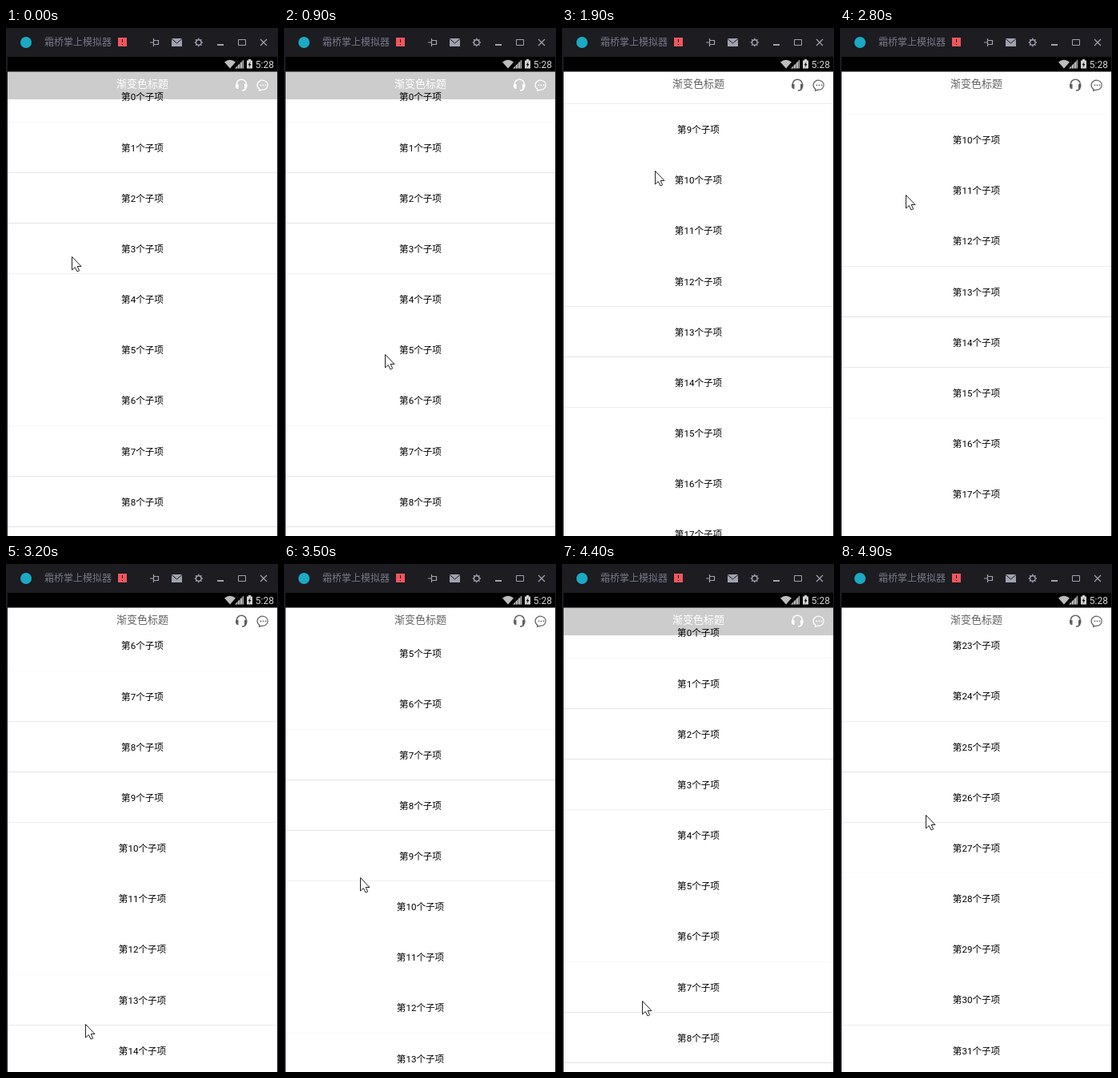
Write an HTML page with a canvas that moves like this. It is 340x634 px and loops after 5 s.

```html
<!DOCTYPE html>
<html lang="zh-CN">
<head>
<meta charset="utf-8">
<title>渐变色标题</title>
<style>
html, body { margin: 0; height: 100%; overflow: hidden; background: #1c1c21; }
canvas { display: block; }
</style>
</head>
<body>
<canvas id="stage" width="340" height="634"></canvas>
<script>
const ctx = document.getElementById('stage').getContext('2d');
const LOOP = 5000, STEP = 100;
const LEFT = 2, WIDTH = 337, TOP = 54, BAR = 35, ROW = 63 + 1 / 6;
const FADE = 288; // scroll distance over which the title bar turns white
const FONTS = 'Roboto, "Noto Sans CJK SC", "Noto Sans CJK", sans-serif';

// Eased progress of a gesture that begins at start and lasts duration ms.
function ease(t, start, duration) {
  const u = Math.min(1, Math.max(0, (t - start) / duration));
  return u * u * (3 - 2 * u);
}

// Swipe up, pull back in two drags, then a hard fling.
function scrollAt(t) {
  return 577.9 * ease(t, 1034.5, 1057)
    - 287.9 * ease(t, 2850, 521.7)
    - 290 * ease(t, 3750, 435.7)
    + 1436.9 * ease(t, 4500, 400);
}

function cursorAt(t) {
  let x = 82, y = 285;
  const glide = (start, duration, dx, dy) => {
    const p = ease(t, start, duration);
    x += dx * p;
    y += dy * p;
  };
  glide(0, 1050, 47, 129);
  glide(1050, 850, -13, -236);
  glide(1900, 900, -34, 30);
  glide(2800, 400, 17, 366);
  glide(3200, 500, -6, -283);
  glide(3700, 600, 7, 254);
  glide(4500, 400, 7, -232);
  return [Math.round(x), Math.round(y)];
}

function rect(x, y, w, h, color) {
  ctx.fillStyle = color;
  ctx.fillRect(x, y, w, h);
}

function fill(path, color) {
  ctx.fillStyle = color;
  ctx.fill(new Path2D(path));
}

function stroke(path, color, width = 1) {
  ctx.strokeStyle = color;
  ctx.lineWidth = width;
  ctx.stroke(new Path2D(path));
}

function disc(x, y, r, color) {
  ctx.fillStyle = color;
  ctx.beginPath();
  ctx.arc(x, y, r, 0, Math.PI * 2);
  ctx.fill();
}

function text(str, x, y, size, color, align = 'center') {
  ctx.font = `${size}px ${FONTS}`;
  ctx.textAlign = align;
  ctx.fillStyle = color;
  ctx.fillText(str, x, y);
}

function drawWindow() {
  const dark = '#1c1c21', gray = '#a0a2ae';
  rect(0, 0, 340, 634, dark);
  disc(25, 18, 7, '#1ca9c4');
  text('霜桥掌上模拟器', 48, 22, 12, '#777988', 'left');
  rect(140, 12, 11, 11, '#f0565c');
  rect(145, 14, 1, 4, dark);
  rect(145, 20, 1, 1, dark);
  stroke('M180 18H184.5M184.5 13V23M184.5 15.5H190.5V20.5H184.5', gray, 1.2);
  rect(207, 13, 13, 10, gray);
  stroke('M207 13.5L213.5 19 220 13.5', dark);
  disc(240.8, 18, 4, gray);
  for (let i = 0; i < 8; i++) {
    const a = i * Math.PI / 4;
    disc(240.8 + 4.6 * Math.cos(a), 18 + 4.6 * Math.sin(a), .8, gray);
  }
  disc(240.8, 18, 2.6, dark);
  rect(264, 20, 8, 2, gray);
  stroke('M290.5 14.5H299.5V21.5H290.5Z', gray);
  stroke('M318 14L326 22M326 14L318 22', gray, 1.2);
}

function drawStatus() {
  const light = '#d4d4d4';
  rect(LEFT, 36, WIDTH, 18, '#000');
  fill('M280 50.5L273 42.5Q280 37 287 42.5Z', '#bdbdbd');
  fill('M286 50.5L297 39.5V50.5Z', '#bdbdbd');
  for (const x of [289, 292, 295]) rect(x, 41, .6, 10, '#222');
  rect(303, 39, 3, 2, light);
  rect(301, 40.5, 7, 10, light);
  fill('M305.5 42L302.5 46.2H304.3L303.5 49.5 306.5 45H304.8Z', '#111');
  text('5:28', 335, 50, 12, light, 'right');
}

function drawList(scroll) {
  rect(LEFT, TOP, WIDTH, 580, '#fff');
  const first = Math.floor(scroll / ROW);
  for (let i = first; i < first + 11; i++) {
    const y = TOP + i * ROW - scroll, line = y + ROW, row = Math.floor(line);
    text(`第${i}个子项`, 170.5, Math.round(y + ROW / 2 + 4.8), 11.6, '#000');
    // Hairlines fade as they fall between pixel rows.
    const strength = Math.min(1, Math.max(0, 1.3 - 3.6 * Math.abs(line - row - .45)));
    rect(LEFT, row, WIDTH, 1, `rgba(0,0,0,${.11 * strength})`);
  }
}

function drawActions(color) {
  text('渐变色标题', 170.5, 73.5, 13, color);
  stroke('M288.3 72V70a6 5.8 0 0 1 12 0V72M300 75Q299 78 295 78', color, 1.5);
  fill('M287 70H290.5V76H289Q287 75 287 73ZM301.5 70H298V76H299.5Q301.5 75 301.5 73Z', color);
  stroke('M317 76.2A6.6 6 0 1 1 320.5 77.2L316.5 78.2Z', color, 1.2);
  for (const x of [318.5, 321.5, 324.5]) disc(x, 71.3, .9, color);
}

function drawBar(scroll) {
  const f = Math.min(1, scroll / FADE), v = Math.round(255 * f);
  rect(LEFT, TOP, WIDTH, BAR, `rgba(${v},${v},${v},${.2 + .8 * f})`);
  drawActions(f < .5 ? '#fff' : '#616161');
  rect(LEFT, TOP, WIDTH, 1, 'rgba(0,0,0,.5)');
}

function drawCursor([x, y]) {
  const arrow = 'M.5 .5V17L4.3 13.6 7 19 9.7 17.8 7.2 12.5H12Z';
  ctx.save();
  ctx.translate(x, y);
  fill(arrow, '#fff');
  stroke(arrow, '#222');
  ctx.restore();
}

function draw() {
  const t = Math.floor(performance.now() % LOOP / STEP) * STEP;
  const scroll = scrollAt(t);
  drawWindow();
  drawStatus();
  ctx.save();
  ctx.beginPath();
  ctx.rect(LEFT, TOP, WIDTH, 580);
  ctx.clip();
  drawList(scroll);
  drawBar(scroll);
  ctx.restore();
  drawCursor(cursorAt(t));
  requestAnimationFrame(draw);
}
draw();
</script>
</body>
</html>
```
